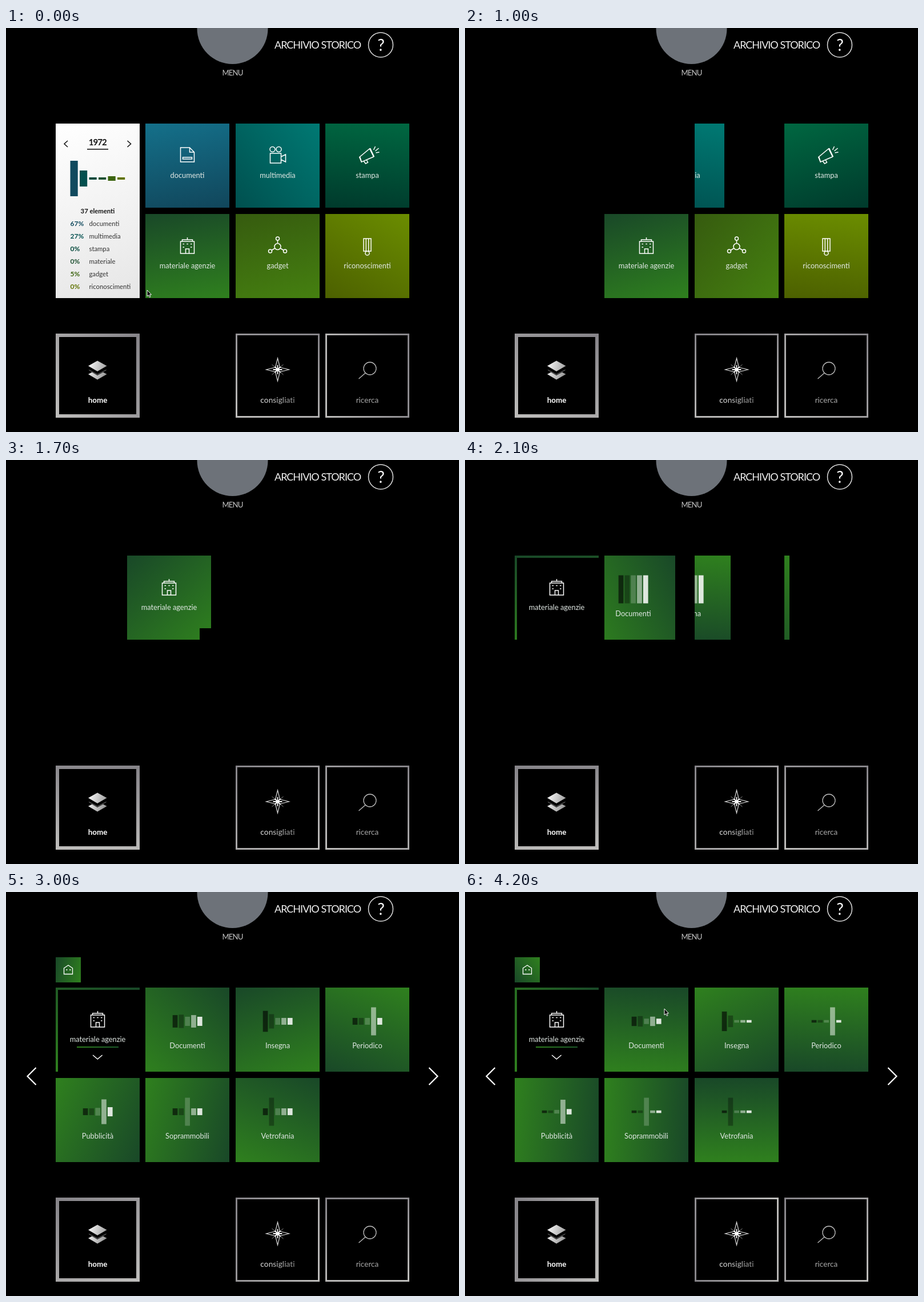
An HTML page with a canvas that plays this animation: 793x706 px, repeating every 4300 ms.

```html
<!DOCTYPE html>
<html lang="it">
<head>
<meta charset="utf-8">
<title>Archivio storico</title>
<style>
html, body { margin: 0; width: 100%; height: 100%; overflow: hidden; background: #000; }
canvas { display: block; }
</style>
</head>
<body>
<canvas id="stage" width="793" height="706"></canvas>
<script>
const ctx = document.getElementById('stage').getContext('2d');
const LOOP = 4300, STEP = 100, SIZE = 147;
const LIGHT = '#2f801e', DARK = '#194828';
const col = i => Math.round(87 + 157.4 * i);
const row = i => Math.round(167 + 157.5 * i);

const clamp = v => Math.min(1, Math.max(0, v));
const lerp = (a, b, p) => a + (b - a) * p;
const ease = p => p * p * (3 - 2 * p);
const span = (t, start, length) => clamp((t - start) / length);

// Piecewise linear value over [time, value] pairs.
function keyed(t, keys) {
  let prev = keys[0];
  for (const next of keys) {
    if (t <= next[0]) return lerp(prev[1], next[1], span(t, prev[0], next[0] - prev[0] || 1));
    prev = next;
  }
  return prev[1];
}

// Angle as in CSS: 0 points up, 90 points right.
function gradient(x, y, w, h, angle, from, to) {
  const a = angle * Math.PI / 180, dx = Math.sin(a), dy = -Math.cos(a);
  const half = (Math.abs(w * dx) + Math.abs(h * dy)) / 2;
  const cx = x + w / 2, cy = y + h / 2;
  const g = ctx.createLinearGradient(cx - dx * half, cy - dy * half, cx + dx * half, cy + dy * half);
  g.addColorStop(0, from);
  g.addColorStop(1, to);
  return g;
}

function rect(x, y, w, h, fill) {
  ctx.fillStyle = fill;
  ctx.fillRect(x, y, w, h);
}

function shade(x, y, w, h, angle, from, to) {
  rect(x, y, w, h, gradient(x, y, w, h, angle, from, to));
}

function text(str, x, y, size, { color = '#e2e9e5', weight = 400, align = 'center', spacing = 0 } = {}) {
  ctx.font = `${weight} ${size}px Lato, "Open Sans", sans-serif`;
  ctx.textAlign = align;
  ctx.letterSpacing = spacing + 'px';
  ctx.fillStyle = color;
  ctx.fillText(str, x, y);
}

function line(d, x = 0, y = 0, width = 1.5, color = '#fff') {
  ctx.save();
  ctx.translate(x, y);
  ctx.lineWidth = width;
  ctx.strokeStyle = color;
  ctx.stroke(new Path2D(d));
  ctx.restore();
}

function fillPath(d, fill) {
  ctx.fillStyle = fill;
  ctx.fill(new Path2D(d));
}

const ring = (x, y, r) => `M${x + r} ${y}A${r} ${r} 0 1 1 ${x - r} ${y}A${r} ${r} 0 1 1 ${x + r} ${y}`;

const icons = {
  page: 'M-12-13H4L12-5V12H-12ZM4-13V-5H12M-8 4H8V7H-8Z',
  camera: ring(-9, -10, 4.5) + ring(2, -10, 4.5) + 'M-13-3H6V14H-13ZM6 3L14-1V12L6 8',
  horn: 'M-13 3L4-11L11 3L-10 12ZM5-12L12 3M-14 3L-10 13M-6 11L-3 15L1 13L-1 9M11-9l3-6M14-7l6-5M15-4l6-1',
  building: 'M-12-7H12V14H-12ZM-9-7V-10H9V-7M0-10V-14M-3 14V6H3V14' +
    'M-8-2.5h2.5M-1.2-2.5h2.5M5.5-2.5h2.5M-8 3h2.5M5.5 3h2.5',
  network: ring(0, 2, 5.5) + ring(0, -12, 3) + ring(-13, 10, 3) + ring(13, 10, 3) +
    'M0-9V-3.5M-5 5L-10.5 8.5M5 5L10.5 8.5',
  medal: 'M-6.5-12H6.5V10H-6.5ZM-2.2-12V10M2.2-12V10' + ring(0, 13.5, 3.6)
};

const sections = [
  { label: 'documenti', icon: 'page', at: [1, 0], colors: ['#11465b', '#14708a'], leave: 760, angle: [[0, 350], [1300, 335]] },
  { label: 'multimedia', icon: 'camera', at: [2, 0], colors: ['#00504f', '#007973'], leave: 880, angle: [[0, 50], [700, 18], [1300, 5]] },
  { label: 'stampa', icon: 'horn', at: [3, 0], colors: ['#003a2c', '#006741'], leave: 1000, angle: [[0, 5], [700, 350], [1300, 335]] },
  { label: 'gadget', icon: 'network', at: [2, 1], colors: ['#365b0f', '#458010'], leave: 1237, angle: [[0, 165], [700, 145], [1300, 118]] },
  { label: 'riconoscimenti', icon: 'medal', at: [3, 1], colors: ['#4c6000', '#6b8d00'], leave: 1357, angle: [[0, 30], [700, 12], [1300, 0]] }
];

const groups = [
  { label: 'Documenti', at: [1, 0], bars: [16, 18, 9, 16, 9], angle: [245, 202, 184] },
  { label: 'Insegna', at: [2, 0], bars: [34, 20, 4, 4, 4], angle: [5, 355, 335] },
  { label: 'Periodico', at: [3, 0], bars: [4, 4, 4, 49, 4], angle: [30, 10, 2] },
  { label: 'Pubblicità', at: [0, 1], bars: [4, 4, 6, 42, 9], angle: [302, 285, 275] },
  { label: 'Soprammobili', at: [1, 1], bars: [4, 4, 49, 4, 4], angle: [290, 277, 272] },
  { label: 'Vetrofania', at: [2, 1], bars: [4, 49, 4, 4, 4], angle: [215, 190, 180] }
];
const barColors = ['rgba(0,0,0,.6)', 'rgba(0,0,0,.32)', 'rgba(255,255,255,.2)', 'rgba(255,255,255,.5)', 'rgba(255,255,255,.85)'];

const summary = [
  ['documenti', 67, '#114a5e', 62], ['multimedia', 27, '#03504f', 28], ['stampa', 0, '#03483a', 4],
  ['materiale', 0, '#1d5030', 4], ['gadget', 5, '#3c6410', 8], ['riconoscimenti', 0, '#5f7200', 4]
];

// Clips to a tile cell and slides its content left by the hidden share.
function sliding(x, y, hidden, draw) {
  if (hidden >= 1) return;
  ctx.save();
  ctx.beginPath();
  ctx.rect(x, y, SIZE, SIZE);
  ctx.clip();
  draw(x - Math.round(SIZE * hidden), y);
  ctx.restore();
}

function caption(x, y, icon, label) {
  line(icons[icon], x + SIZE / 2, y + 55);
  text(label, x + SIZE / 2, y + 95, 12.8);
}

function drawHeader() {
  ctx.fillStyle = '#6d7279';
  ctx.beginPath();
  ctx.arc(396.5, 1, 62, 0, Math.PI * 2);
  ctx.fill();
  text('MENU', 396.5, 83, 13.2, { spacing: -0.9, color: '#c4c4c4' });
  text('ARCHIVIO STORICO', 470, 36, 18, { align: 'left', spacing: -1, color: '#f2f2f2' });
  line(ring(656, 29.5, 21.5), 0, 0, 1.5, '#ddd');
  text('?', 656.5, 39.5, 28, { color: '#fff' });
}

function frameTile(x, border, angle) {
  shade(x, 534, SIZE, SIZE, angle, '#858388', '#bfbebc');
  rect(x + border, 534 + border, SIZE - 2 * border, SIZE - 2 * border, '#000');
}

function drawFooter(t) {
  const turn = t / LOOP * 125;
  frameTile(col(0), 6, 235 - turn);
  frameTile(col(2), 3, 200 - turn);
  frameTile(col(3), 3, 260 - turn);

  const metal = gradient(144, 581, 33, 33, 110, '#fff', '#8b8b8b');
  fillPath('M144 590.5L160 581.5L176.5 590.5L160 600Z', metal);
  fillPath('M144 605L150.5 601.5L160 607L170 601.5L176.5 605L160 614.5Z', metal);
  line('M145 597.5L160 605.5L175.5 597.5', 0, 0, 1, '#777');
  text('home', 160.5, 655, 13.4, { weight: 700, color: '#fff' });

  const x = col(2) + SIZE / 2;
  line('M0-20L4-4L20 0L4 4L0 20L-4 4L-20 0L-4-4Z', x, 597, 1.2, '#d8d8d8');
  line('M-10-9L10 9M10-9L-10 9', x, 597, 0.9, '#9a9a9a');
  line('M0-8V8M-8 0H8M-5-5L5 5M5-5L-5 5', x, 597, 1.8);
  text('consigliati', x, 655, 13.6, { spacing: 0.1, color: gradient(444, 645, 62, 12, 90, '#eee', '#8f8f8f') });

  line(ring(637, 595, 11) + 'M629 603L617.5 613', 0, 0, 1.3, '#bbb');
  text('ricerca', 632.5, 655, 13.6, { color: '#a8a8a8' });
}

function drawPanel(t) {
  const gone = ease(span(t, 665, 240));
  if (gone >= 1) return;
  shade(col(0), row(0), SIZE, Math.round(305 * (1 - gone)), 160, '#ffffff', '#e6e6e6');
  ctx.save();
  ctx.globalAlpha = 1 - span(t, 500, 180);
  const ink = '#151515';
  text('1972', 160.3, 205, 15, { weight: 700, color: ink, spacing: -0.9 });
  rect(142, 211, 37, 1.6, ink);
  line('M108 197L102 202.5L108 208M212.5 197L218.5 202.5L212.5 208', 0, 0, 1.6, ink);
  text('37 elementi', 160.5, 323.5, 11.3, { weight: 700, color: ink });
  summary.forEach(([name, share, color, bar], i) => {
    rect(112.5 + 16.5 * i, 263 - bar / 2, 13.2, bar, color);
    const base = 345.5 + 22.05 * i;
    text(share + '%', 112.5, base, 12, { weight: 700, align: 'left', color });
    text(name, 145.5, base, 11.3, { align: 'left', color: '#333' });
  });
  ctx.restore();
}

function drawSections(t) {
  for (const s of sections) {
    sliding(col(s.at[0]), row(s.at[1]), ease(span(t, s.leave, 200)), (x, y) => {
      shade(x, y, SIZE, SIZE, keyed(t, s.angle), ...s.colors);
      caption(x, y, s.icon, s.label);
    });
  }
}

function drawSelected(t) {
  const x = Math.round(lerp(col(1), col(0), ease(span(t, 1598, 350))));
  const y = Math.round(lerp(row(1), row(0), ease(span(t, 1450, 200))));
  const angle = keyed(t, [[0, 170], [700, 175], [1300, 152], [1700, 138], [2600, 215], [3500, 195], [4200, 240]]);
  shade(x, y, SIZE, SIZE, angle, DARK, LIGHT);
  const hole = Math.round(143 * ease(span(t, 1600, 430)));
  rect(x + SIZE - hole, y + SIZE - hole, hole, hole, '#000');
  caption(x, y, 'building', 'materiale agenzie');
  if (t >= 2200) {
    shade(124, 270, 73, 2, 90, '#2f801e', '#1d5a2a');
    line('M152 285L160.3 292L168.6 285', 0, 0, 1.4);
  }
}

function drawGroups(t) {
  const rest = Math.exp(-Math.max(0, t - 2250) / 430);
  groups.forEach((g, i) => {
    const hidden = 1 - ease(span(t, 1950 + 60 * i, 200));
    sliding(col(g.at[0]), row(g.at[1]), hidden, (x, y) => {
      const [a, b, c] = g.angle, cx = x + SIZE / 2;
      shade(x, y, SIZE, SIZE, keyed(t, [[2600, a], [3500, b], [4200, c]]), DARK, LIGHT);
      g.bars.forEach((size, k) => {
        const h = lerp(size, 49, rest);
        rect(cx - 25.8 + 10.8 * k, y + 59 - h / 2, 8.7, h, barColors[k]);
      });
      text(g.label, cx, y + 106, 12.8);
    });
  });
}

function drawNavigation(t) {
  if (t >= 2200) {
    shade(87, 114, 44, 44, keyed(t, [[2600, 115], [3500, 90], [4200, 55]]), DARK, LIGHT);
    line('M101.5 133L109 128L116.5 133V143.5H101.5ZM105 136h2.5M111 136h2.5', 0, 0, 1.3);
  }
  if (t >= 2500) line('M52.5 307L37.5 322L52.5 337M740.5 307L755.5 322L740.5 337', 0, 0, 2.2);
}

function drawCursor(t) {
  if (t >= 1000 && t < 4000) return;
  const p = ease(span(t, 0, 500));
  const [x, y] = t < 1000 ? [lerp(247, 314, p), lerp(458, 407, p)] : [349, 204];
  ctx.save();
  ctx.translate(x, y);
  const arrow = 'M0 0V11L2.5 8.7L4.3 12.5L6 11.7L4.3 8H7.5Z';
  fillPath(arrow, '#000');
  line(arrow, 0, 0, 1);
  ctx.restore();
}

function draw(t) {
  rect(0, 0, 793, 706, '#000');
  drawHeader();
  drawFooter(t);
  drawPanel(t);
  drawSections(t);
  drawGroups(t);
  drawSelected(t);
  drawNavigation(t);
  drawCursor(t);
}

function tick() {
  draw(Math.floor(performance.now() % LOOP / STEP) * STEP);
  requestAnimationFrame(tick);
}
tick();
</script>
</body>
</html>
```
